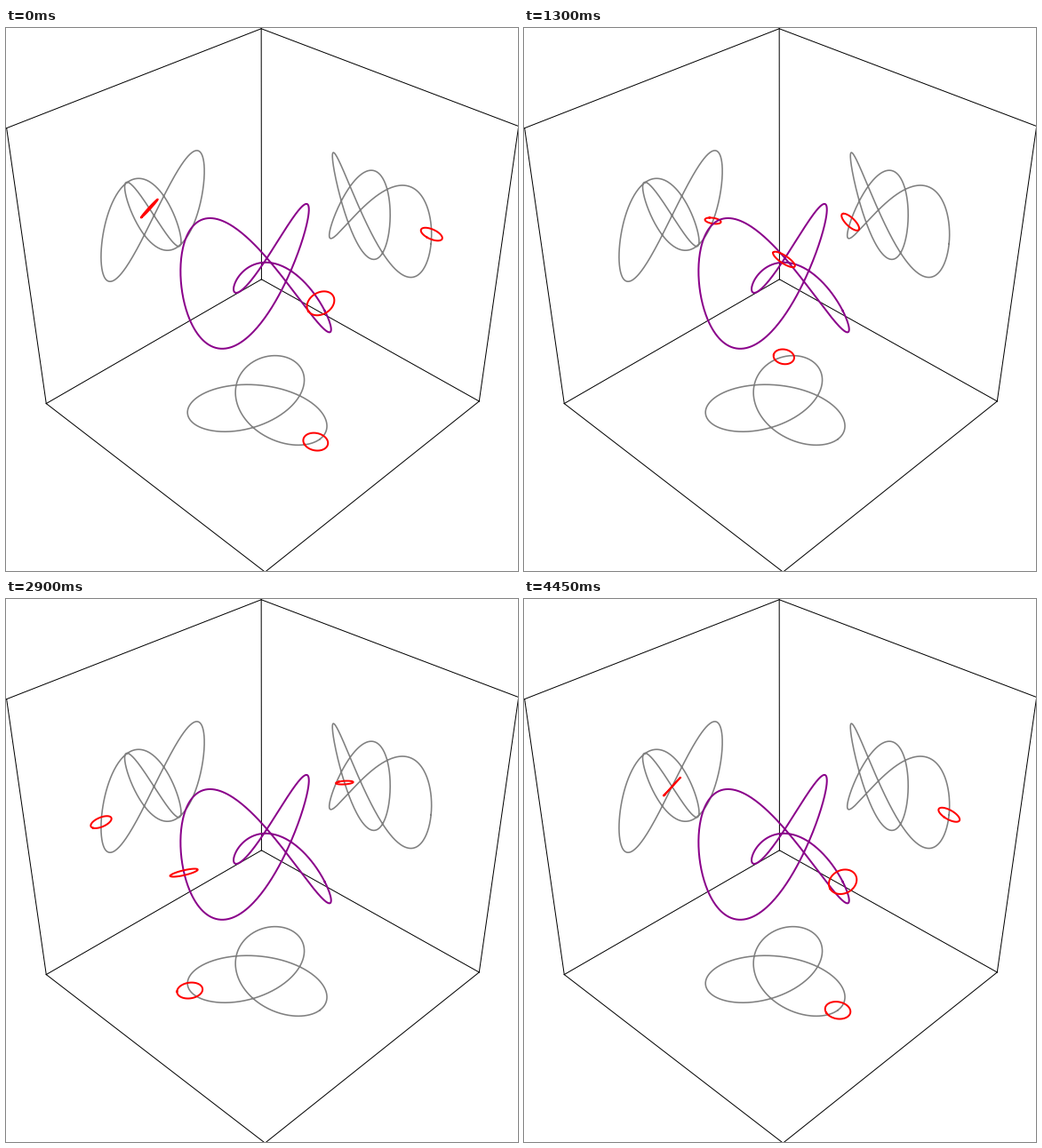
A matplotlib script that plays this animation: 576 by 611 pixels, repeating every 4.5 s.

```python
import numpy as np
import matplotlib.pyplot as plt
from matplotlib.animation import FuncAnimation

W, H, DPI = 576, 611, 64
FRAMES, INTERVAL = 90, 50
BOX = 6.0      # half edge length of the box
RADIUS = 0.5   # radius of the ring around the knot

# Perspective camera aimed at the centre of the box
VIEW = np.array([0.5780, 0.5873, 0.5666])
VIEW /= np.linalg.norm(VIEW)
DISTANCE, ZOOM = 3.384, 1263
CENTRE = 289.1, 279.4
RIGHT = np.array([VIEW[1], -VIEW[0], 0]) / np.hypot(VIEW[0], VIEW[1])
UP = np.cross(RIGHT, VIEW)
UP *= np.sign(UP[2])


def project(points):
    p = np.asarray(points, float) / (2 * BOX)
    scale = ZOOM / (DISTANCE - p @ VIEW)
    return CENTRE[0] + p @ RIGHT * scale, CENTRE[1] - p @ UP * scale


def knot(t):
    return np.stack([np.cos(t) + 2 * np.cos(2 * t),
                     2 * np.sin(2 * t) - np.sin(t),
                     2 * np.sin(3 * t)], axis=-1)


def tangent(t):
    d = np.array([-np.sin(t) - 4 * np.sin(2 * t),
                  4 * np.cos(2 * t) - np.cos(t),
                  6 * np.cos(3 * t)])
    return d / np.linalg.norm(d)


def ring(t):
    """Circle around the knot in the plane normal to it."""
    axis = tangent(t)
    u = np.cross(axis, VIEW)
    u /= np.linalg.norm(u)
    v = np.cross(axis, u)
    a = np.linspace(0, 2 * np.pi, 73)[:, None]
    return knot(t) + RADIUS * (np.cos(a) * u + np.sin(a) * v)


def with_shadows(points):
    """The three wall shadows followed by the points themselves."""
    for axis in range(3):
        flat = points.copy()
        flat[:, axis] = -BOX
        yield flat
    yield points


fig = plt.figure(figsize=(W / DPI, H / DPI), dpi=DPI, facecolor="white")
ax = fig.add_axes([0, 0, 1, 1])
ax.set_xlim(0, W)
ax.set_ylim(H, 0)
ax.axis("off")


def draw(points, color, width, order):
    line, = ax.plot(*project(points), color=color, lw=width * 72 / DPI,
                    zorder=order)
    return line


# Edges of the three back walls
corners = BOX * np.array([(x, y, z) for x in (-1, 1) for y in (-1, 1)
                          for z in (-1, 1) if x + y + z < 3])
for i, p in enumerate(corners):
    for q in corners[i + 1:]:
        if np.count_nonzero(p != q) == 1:
            draw([p, q], "black", 1, 1)

path = knot(np.linspace(0, 2 * np.pi, 601))
*shadows, curve = with_shadows(path)
for shadow in shadows:
    draw(shadow, "#808080", 1.6, 2)
draw(curve, "#8a008a", 2, 4)

rings = [draw(p, "red", 2, order)
         for p, order in zip(with_shadows(ring(0.0)), (3, 3, 3, 5))]


def update(frame):
    t = 2 * np.pi * (frame + 1) / FRAMES
    for line, points in zip(rings, with_shadows(ring(t))):
        line.set_data(*project(points))
    return rings


anim = FuncAnimation(fig, update, frames=FRAMES, interval=INTERVAL,
                     repeat=True, repeat_delay=0)
plt.show()
```
